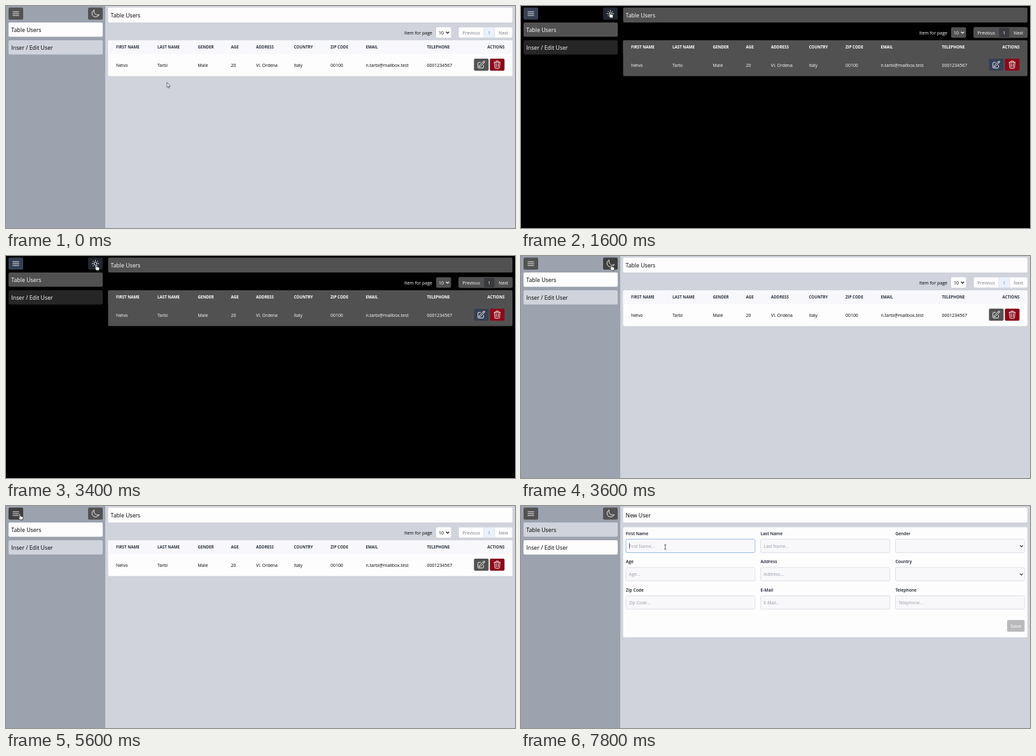
Write an HTML page that moves like this. It is 800 by 350 pixels and loops after 8 s.

```html
<!DOCTYPE html>
<html lang="en">
<head>
<meta charset="utf-8">
<title>User table</title>
<style>
  html, body { margin: 0; width: 100%; height: 100%; overflow: hidden; background: #000; }
  svg { display: block; width: 100%; height: 100%; font-family: "Open Sans", "Noto Sans", sans-serif; }
  text { white-space: pre; }
</style>
</head>
<body>
<svg id="stage" viewBox="0 0 800 350"></svg>
<script>
const LOOP = 8000, STEP = 200;
const stage = document.getElementById('stage');

const LIGHT = {
  side: '#9ca2ae', main: '#d0d3db', card: '#fefdfe', head: '#f8f8fc', text: '#000', th: '#2c3442',
  button: '#525252', hover: '#3f3f3f', edit: '#525252', active: '#fefdfe', idle: '#d0d3db',
  page: '#eaf1fc', pageText: '#4b78c0', pager: '#747985', line: '#d9dbe2'
};
const DARK = {
  side: '#000', main: '#000', card: '#525152', head: '#525152', text: '#fff', th: '#fff',
  button: '#354054', hover: '#20262f', edit: '#354054', active: '#525152', idle: '#262627',
  page: '#3a3b3f', pageText: '#fff', pager: '#fff', line: '#525152'
};

const ICONS = {
  bars: 'M3.75 6.75h16.5M3.75 12h16.5M3.75 17.25h16.5',
  moon: 'M21.75 15A9.7 9.7 0 0118 15.75 9.75 9.75 0 019 2.25 9.75 9.75 0 1021.75 15z',
  sun: 'M12 3v2.25M18.4 5.6l-1.6 1.6M21 12h-2.25M18.4 18.4l-1.6-1.6M12 18.75V21M7.2 16.8l-1.6 1.6M5.25 12H3M7.2 7.2L5.6 5.6M15.75 12a3.75 3.75 0 11-7.5 0 3.75 3.75 0 017.5 0z',
  edit: 'M16.9 4.5l1.7-1.7a1.9 1.9 0 012.6 2.6L10.6 16.1Q9.8 16.9 8.7 17.2L6 18l.8-2.7Q7.1 14.2 7.9 13.4zM16.9 4.5l2.6 2.6M18 14v4.75A2.25 2.25 0 0115.75 21H5.25A2.25 2.25 0 013 18.75V8.25A2.25 2.25 0 015.25 6H10',
  trash: 'M14.7 9l-.3 9M9.6 18L9.3 9M3.75 6Q12 4.8 20.25 6M19.2 5.8l-1 13.9a2.25 2.25 0 01-2.3 2H8.1a2.25 2.25 0 01-2.3-2l-1-13.9M8.25 5.4V4.5a2.2 2.2 0 012.1-2.2h3.3a2.2 2.2 0 012.1 2.2v.9',
  table: 'M3 5h18v14H3zM3 9.6h18M3 14.3h18M12 5v14',
  user: 'M15.75 6.5a3.75 3.75 0 11-7.5 0 3.75 3.75 0 017.5 0zM4.5 20Q4.5 13.5 12 13.5T19.5 20Q12 23 4.5 20z'
};

const POINTERS = {
  arrow: ['M0 0V7.2L1.7 5.7 2.8 8.3 3.9 7.8 2.8 5.3H5z', 'white', '#333'],
  hand: ['M0 .8Q.9-.5 1.8 .8V4L5 4.7Q6 5 5.9 6.2L5.2 9.8H1.3L-1.5 6.4Q-1.5 5.1 0 6z', 'white', '#111'],
  beam: ['M-1.3-3.2H1.3M0-3.2V3.6M-1.3 3.6H1.3', 'none', '#333']
};

const HEADINGS = ['FIRST NAME', 'LAST NAME', 'GENDER', 'AGE', 'ADDRESS', 'COUNTRY', 'ZIP CODE', 'EMAIL', 'TELEPHONE'];
const RECORD = ['Nelvo', 'Tarbi', 'Male', '20', 'Vl. Ordena', 'Italy', '00100', 'n.tarbi@mailbox.test', '0001234567'];
const COLUMNS_WIDE = [173, 238, 301.5, 353.5, 393, 452.5, 510, 565.5, 661.5];
const COLUMNS_FULL = [48, 126, 201.5, 264, 311, 382.5, 451, 518, 633];
const FIELDS = ['First Name', 'Last Name', 'Gender', 'Age', 'Address', 'Country', 'Zip Code', 'E-Mail', 'Telephone'];

// Pointer stops: time, x, y
const PATH = [
  [0, 253, 121], [1000, 139, 9], [1600, 139, 9], [3000, 141, 13], [3600, 141, 13], [4400, 21, 12],
  [5600, 21, 12], [6400, 40, 62], [6800, 40, 62], [7600, 226.7, 64.5], [8000, 226.7, 64.5]
];

const rect = (x, y, w, h, fill, r = 2, stroke = 'none') =>
  `<rect x="${x}" y="${y}" width="${w}" height="${h}" rx="${r}" fill="${fill}" stroke="${stroke}" stroke-width=".7"/>`;
const text = (x, y, value, size, fill, weight = 400, anchor = 'start') =>
  `<text x="${x}" y="${y}" font-size="${size}" fill="${fill}" font-weight="${weight}" text-anchor="${anchor}">${value}</text>`;
const path = (d, stroke, width, fill = 'none', transform = '') =>
  `<path d="${d}" fill="${fill}" stroke="${stroke}" stroke-width="${width}" stroke-linecap="round" stroke-linejoin="round" transform="${transform}"/>`;
const icon = (name, x, y, color = '#fff', scale = .56) =>
  path(ICONS[name], color, 1.6, 'none', `translate(${x} ${y}) scale(${scale}) translate(-12 -12)`);
const chevron = (x, y, color) => path(`M${x - 2} ${y - 1}l2 2 2-2`, color, 1.1);
const iconButton = (x, y, fill, name, scale) => rect(x, y, 23, 19, fill) + icon(name, x + 11.5, y + 9.5, '#fff', scale);

function sidebar(s, c) {
  const fills = s.form ? [c.idle, c.active] : [c.active, c.idle];
  const themeIcon = s.dark ? 'sun' : 'moon';
  let out = rect(0, 0, s.compact ? 31 : 156, 350, c.side, 0) +
    iconButton(4, 2.5, s.hover === 'menu' ? c.hover : c.button, 'bars');
  if (s.compact) {
    out += iconButton(4, 25.5, c.button, themeIcon, .59);
    ['table', 'user'].forEach((name, i) => {
      const y = 48.5 + i * 26;
      out += rect(4, y, 23, 21, fills[i]) + icon(name, 15.5, y + 10.5, c.text);
    });
    return out;
  }
  out += iconButton(129, 2.5, s.hover === 'theme' ? c.hover : c.button, themeIcon, .59);
  ['Table Users', 'Inser / Edit User'].forEach((label, i) => {
    const y = 26 + i * 28;
    out += rect(4, y, 148, 22.6, fills[i]) + text(8.3, y + 14.7, label, 8.8, c.text);
  });
  return out;
}

function tableView(s, c, left) {
  const columns = s.compact ? COLUMNS_FULL : COLUMNS_WIDE;
  let out = text(626, 45, 'Item for page', 7, c.text) +
    rect(676, 33.5, 23.5, 16.5, c.card) + text(680, 44.8, '10', 7, c.text) + chevron(694, 42, c.text) +
    rect(711.5, 33.5, 84.5, 16.5, c.card, 2, c.line) + rect(751, 33.5, 17, 16.5, c.page, 0, c.line) +
    text(731.3, 44.5, 'Previous', 6.9, c.pager, 400, 'middle') +
    text(759.5, 44.5, '1', 6.9, c.pageText, 400, 'middle') +
    text(781.8, 44.5, 'Next', 6.9, c.pager, 400, 'middle') +
    rect(left, 54, 796 - left, 56.5, c.card) + rect(left, 54, 796 - left, 22, c.head);
  columns.forEach((x, i) => {
    out += text(x, 67.2, HEADINGS[i], 6.2, c.th, 700) + text(x, 95.6, RECORD[i], 6.95, c.text);
  });
  return out + text(783.7, 67.2, 'ACTIONS', 6.2, c.th, 700, 'end') +
    iconButton(735.5, 83, c.edit, 'edit', .59) + iconButton(760.5, 83, '#8b0a1a', 'trash', .59);
}

function formView(s, c) {
  let out = rect(160.5, 33.5, 635.5, 173.5, c.card);
  FIELDS.forEach((label, i) => {
    const x = 164.8 + i % 3 * 211.8, y = 52.3 + Math.floor(i / 3) * 44.6;
    const focused = s.focus && i === 0;
    out += text(x, y - 6.5, label, 6.7, '#111827', 600) +
      rect(x, y, 203, 21.2, '#f8f8fb', 2, focused ? '#6f9fe0' : '#d1d5db');
    out += i === 2 || i === 5
      ? chevron(x + 198, y + 11, '#222')
      : text(x + 5, y + 13.3, label + '...', 6.85, '#959ba8');
    if (focused) out += rect(x + 5.3, y + 6, .7, 9, '#222', 0);
  });
  return out + rect(764, 179.7, 27.5, 18.5, '#b9b8bb') + text(777.7, 191.8, 'Save', 7.8, '#fff', 400, 'middle');
}

function pointerAt(t) {
  const next = PATH.findIndex(stop => stop[0] > t);
  const [t0, x0, y0] = PATH[next - 1], [t1, x1, y1] = PATH[next];
  const u = (t - t0) / (t1 - t0), eased = u * u * (3 - 2 * u);
  return { x: x0 + (x1 - x0) * eased, y: y0 + (y1 - y0) * eased };
}

function hoveredPart({ x, y }, form) {
  const inside = (left, top, right, bottom) => x >= left && x <= right && y >= top && y <= bottom;
  if (inside(4, 2.5, 27, 21.5)) return 'menu';
  if (inside(129, 2.5, 152, 21.5)) return 'theme';
  if (inside(4, 26, 152, 48.6) || inside(4, 54, 152, 76.6)) return 'item';
  return form && inside(164.8, 52.3, 367.8, 73.5) ? 'field' : '';
}

function drawPointer({ x, y }, hover) {
  const shape = hover === 'field' ? 'beam' : hover ? 'hand' : 'arrow';
  const [d, fill, stroke] = POINTERS[shape];
  return path(d, stroke, .7, fill, `translate(${x} ${y})`);
}

function render(t) {
  const during = (from, to) => t >= from && t < to;
  const pointer = pointerAt(t);
  const form = t >= 6800;
  const s = {
    dark: during(1600, 3600), compact: during(4600, 5600), form, focus: t >= 7600,
    hover: hoveredPart(pointer, form)
  };
  const c = s.dark ? DARK : LIGHT;
  const left = s.compact ? 35.5 : 160.5;
  stage.innerHTML = rect(0, 0, 800, 350, c.main, 0) + sidebar(s, c) +
    rect(left, 2.5, 796 - left, 23.5, c.card) +
    text(left + 4.1, 17.8, form ? 'New User' : 'Table Users', 8.7, c.text) +
    (form ? formView(s, c) : tableView(s, c, left)) + drawPointer(pointer, s.hover);
}

let shown = -1;
const start = performance.now();
function tick() {
  const elapsed = (performance.now() - start) % LOOP;
  const t = Math.floor(elapsed / STEP) * STEP;
  if (t !== shown) render(shown = t);
  requestAnimationFrame(tick);
}
tick();
</script>
</body>
</html>
```
